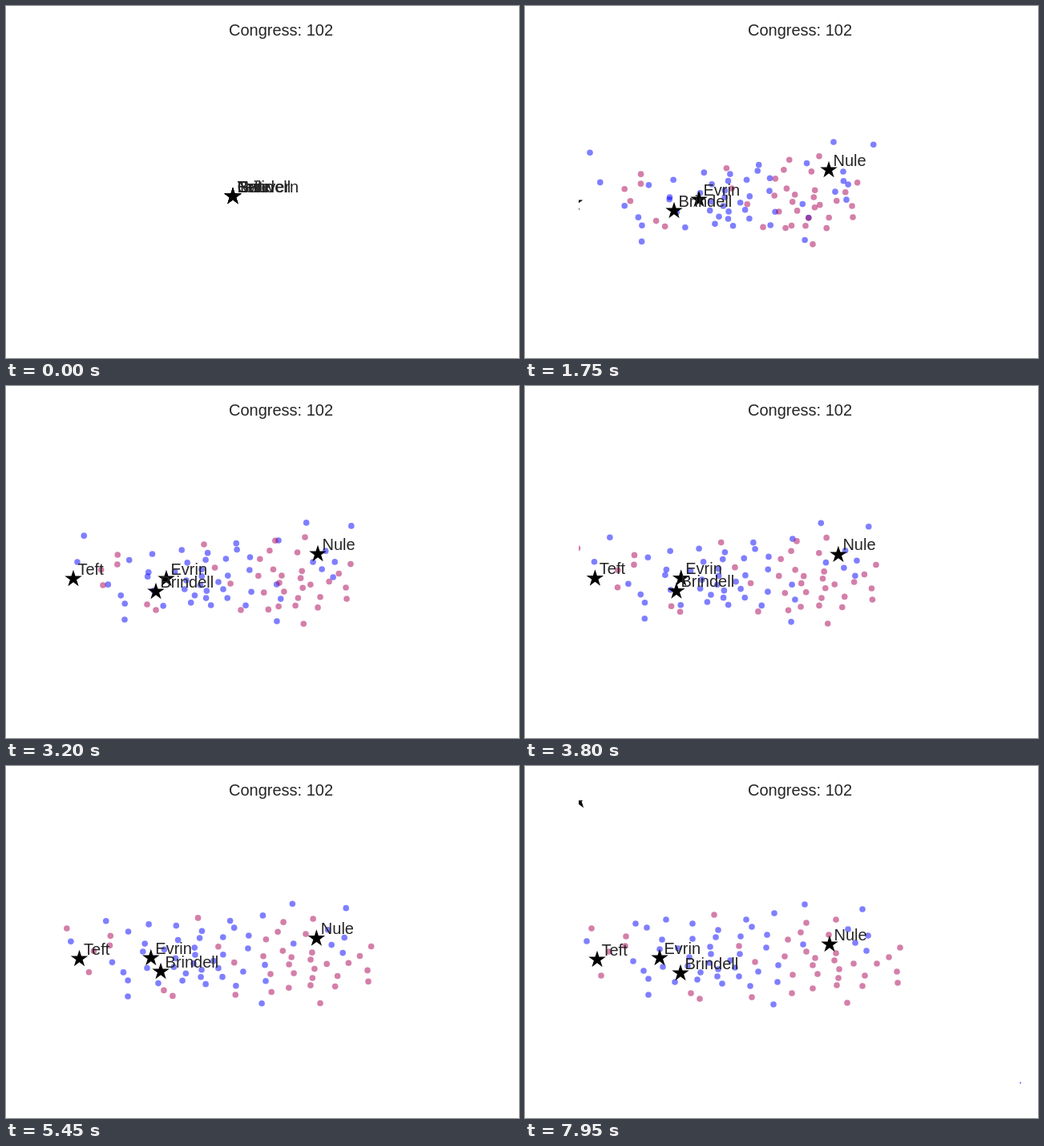
An HTML page with a canvas for the animation above (8 s loop, 640 by 440 pixels).

```html
<!DOCTYPE html>
<html lang="en">
<head>
<meta charset="utf-8">
<title>Congress map</title>
<style>
  html, body { margin: 0; width: 100%; height: 100%; overflow: hidden; background: #fff; }
  canvas { display: block; width: 640px; height: 440px; }
</style>
</head>
<body>
<canvas id="stage" width="640" height="440"></canvas>
<script>
const ctx = document.getElementById('stage').getContext('2d');
const LOOP = 8000, STEP = 50, SPREAD = 750, SETTLE = 3200, END = 7950;
const CX = 283, CY = 238;
const LEFT = 67, TOP = 43, RIGHT = 619, BOTTOM = 397;
const BLUE = 'rgba(0,0,255,.5)', RED = 'rgba(170,0,85,.5)';

// settled places, x and y in turn
const blueDots = [
  349,173, 421,179, 403,204, 138,197, 77,219, 154,286, 310,298, 311,184, 347,223, 412,221,
  428,212, 426,231, 315,270, 276,192, 283,201, 302,211, 301,227, 316,249, 281,275, 267,263,
  291,257, 262,252, 246,272, 256,243, 241,254, 240,263, 230,246, 232,235, 219,258, 215,267,
  203,250, 205,239, 187,270, 172,251, 168,229, 191,228, 209,197, 176,192, 171,217, 152,202,
  209,216, 231,226, 238,214, 241,205, 269,213, 268,235, 135,244, 148,256, 154,266];
const redDots = [
  388,192, 126,213, 105,232, 125,225, 95,262, 207,284, 218,291, 236,186, 267,225, 287,245,
  334,261, 324,238, 328,217, 351,196, 344,208, 351,232, 362,240, 365,260, 359,249, 379,211,
  388,234, 386,243, 392,254, 410,247, 424,262, 391,265, 421,275, 389,274, 359,278, 283,289,
  333,284, 402,296, 464,257, 465,271, 439,247, 468,227, 454,239, 83,203];

// drift anchors: place, then the offset from which dots near it come
const blueDrift = [
  [385,180,24,-11], [347,223,36,-3], [420,221,-18,8], [138,197,-41,-10], [77,219,12,1],
  [154,280,-6,6], [312,285,28,-4], [311,184,29,9], [295,215,2,3], [260,250,9,2],
  [195,240,20,4], [160,200,9,20]];
const redDrift = [
  [388,192,-15,-3], [115,225,14,-2], [95,262,26,-13], [212,287,-31,-11], [236,186,11,12],
  [280,240,-7,2], [375,250,-18,-3], [410,268,-32,2], [283,289,10,-9], [465,264,-40,-5],
  [83,203,-22,0]];

const starTimes = [SPREAD, 1750, SETTLE, 4450, 6400, END];
const stars = [
  { name: 'Nule', x: [377, 379, 389, 393, 382, 380], y: [195, 205, 210, 212, 219, 223] },
  { name: 'Teft', x: [70, 61.5, 84, 91, 92, 90], y: [239, 246, 241, 240, 242, 242] },
  { name: 'Brindell', x: [174, 186, 187, 191, 195, 194], y: [254, 256, 257, 256, 258, 259] },
  { name: 'Evrin', x: [226, 217, 200, 189, 173, 168], y: [241, 242, 241, 240, 240, 240] }
];
const roverTimes = [3300, 3400, 3700, 3800, 6400, END];
const rover = { name: 'Gauvern', x: [50, 68, 68, 55, 63.5, 66.5], y: [38, 46, 47, 40, 40, 43] };

const mix = (a, b, k) => a + (b - a) * k;
const growth = t => t < 2 * STEP ? 0 : ((t - STEP) / (SPREAD - STEP)) ** 2;
const burst = (x, y, g) => [mix(CX, x, g), mix(CY, y, g)];

function track(times, values, t) {
  let i = 1;
  while (i < times.length - 1 && t > times[i]) i++;
  const k = (t - times[i - 1]) / (times[i] - times[i - 1]);
  return mix(values[i - 1], values[i], Math.max(0, Math.min(1, k)));
}

// Offset of a place, weighted by nearness to the anchors.
function driftAt(anchors, x, y) {
  let sum = 0, dx = 0, dy = 0;
  for (const [ax, ay, ox, oy] of anchors) {
    const w = ((x - ax) ** 2 + (y - ay) ** 2 + 40) ** -2;
    sum += w;
    dx += w * ox;
    dy += w * oy;
  }
  return [dx / sum, dy / sum];
}

function makeGroup(color, flat, anchors) {
  const dots = [];
  for (let i = 0; i < flat.length; i += 2) {
    const x = flat[i], y = flat[i + 1];
    dots.push([x, y, ...driftAt(anchors, x, y)]);
  }
  return { color, dots };
}
const groups = [makeGroup(BLUE, blueDots, blueDrift), makeGroup(RED, redDots, redDrift)];

function drawDot(x, y) {
  ctx.beginPath();
  ctx.arc(x, y, 3.8, 0, Math.PI * 2);
  ctx.fill();
}

function drawStar(x, y) {
  ctx.beginPath();
  for (let i = 0; i < 10; i++) {
    const r = i % 2 ? 4.3 : 11.3, a = i * Math.PI / 5;
    ctx.lineTo(x + r * Math.sin(a), y - r * Math.cos(a));
  }
  ctx.fill();
}

function drawDots(t) {
  const left = Math.max(0, (END - t) / (END - SETTLE));
  const k = Math.min(1.4, left ** 1.75);
  const g = Math.min(1, growth(t));
  for (const { color, dots } of groups) {
    ctx.fillStyle = color;
    for (const [x, y, dx, dy] of dots) drawDot(...burst(x + dx * k, y + dy * k, g));
  }
  // one dot flies out of the axes and peeps in again at the corner
  ctx.fillStyle = BLUE;
  drawDot(...(t < 7000 ? burst(581, 368, growth(t)) : [620.5, 398]));
}

function starSpots(t) {
  const g = Math.min(1, growth(t));
  const spots = stars.map(({ name, x, y }) =>
    [name, ...burst(track(starTimes, x, t), track(starTimes, y, t), g)]);
  const free = t < roverTimes[0]
    ? burst(104, 68, growth(t))
    : [track(roverTimes, rover.x, t), track(roverTimes, rover.y, t)];
  return [...spots, [rover.name, ...free]];
}

function draw(t) {
  ctx.fillStyle = '#fff';
  ctx.fillRect(0, 0, 640, 440);

  const spots = starSpots(t);
  ctx.save();
  ctx.beginPath();
  ctx.rect(LEFT, TOP, RIGHT - LEFT, BOTTOM - TOP);
  ctx.clip();
  drawDots(t);
  ctx.fillStyle = '#000';
  for (const [, x, y] of spots) drawStar(x, y);
  ctx.restore();

  ctx.fillStyle = '#262626';
  ctx.font = '20px "Liberation Sans", Arial, sans-serif';
  ctx.textAlign = 'left';
  for (const [name, x, y] of spots) {
    const inside = x >= LEFT && x <= RIGHT && y >= TOP && y <= BOTTOM;
    if (inside) ctx.fillText(name, x + 5.5, y - 5.5);
  }
  ctx.textAlign = 'center';
  ctx.fillText('Congress: 102', 343, 37);
}

function tick() {
  const t = performance.now() % LOOP;
  draw(Math.floor(t / STEP) * STEP);
  requestAnimationFrame(tick);
}
tick();
</script>
</body>
</html>
```
